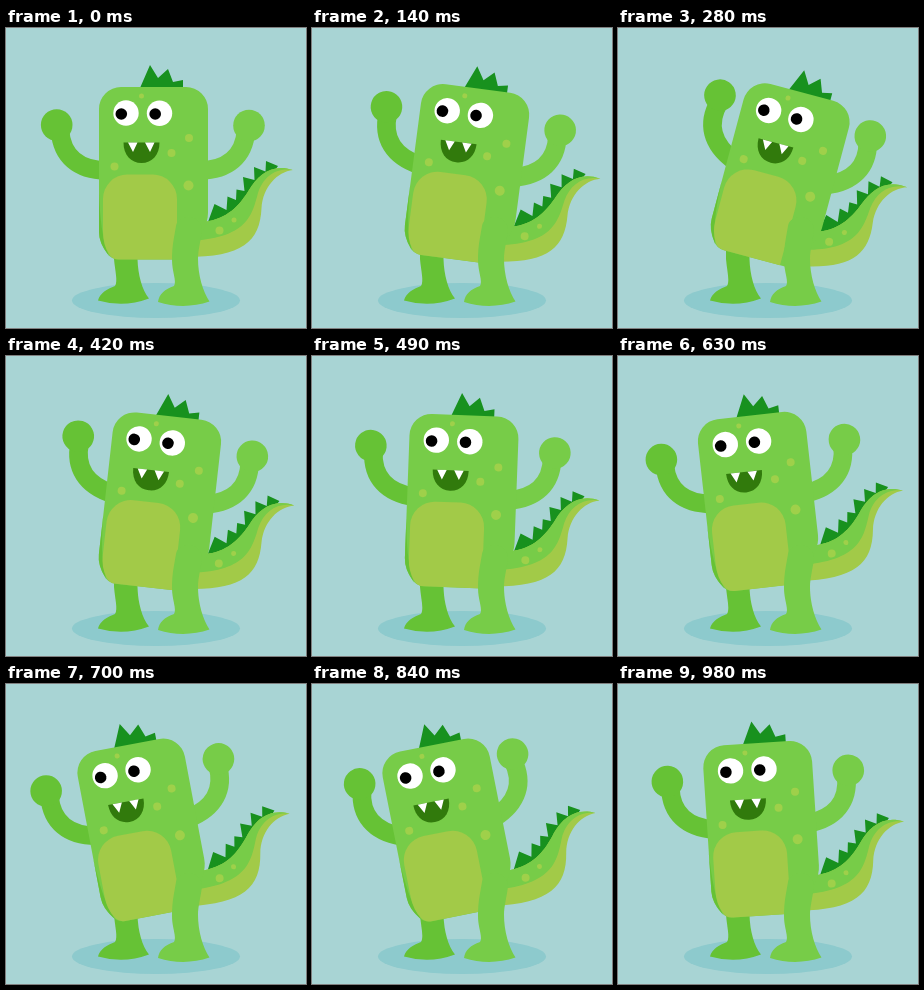
An HTML page for the animation above (1050 ms loop, 300 by 300 pixels).

```html
<!DOCTYPE html>
<html lang="en">
<head>
<meta charset="utf-8">
<title>Dancing dinosaur</title>
<style>
  html, body { margin: 0; height: 100%; overflow: hidden; background: #a8d4d4; }
  svg { display: block; width: 100%; height: 100%; }
  .skin { fill: #77cc48; }
  .shade { fill: #66c235; }
  .belly { fill: #a2ca48; }
  .spot { fill: #9fd04a; }
  .spike { fill: #18911e; }
  .limb { fill: none; stroke-width: 18.6; }
</style>
</head>
<body>
<svg viewBox="0 0 300 300">
  <ellipse cx="150" cy="272.5" rx="84" ry="17.5" fill="#8dcacd"/>

  <g id="tail">
    <path class="spike" d="M202 194L208.500 176L220.500 182L221.500 168.500L230 172L230.500 161.500L238.500 163L237 149L248.500 152L248 139L259.500 143.500L260 133L272 138L262 152L240 182L215 196Z"/>
    <path class="belly" d="M175 198L203 193C224 189 235 175 243 162C252 147 266 135 287 142C271 144 257 159 255.500 180C254 214 236 229 180 229Z"/>
    <path class="skin" d="M175 198L203 193C224 189 235 175 243 162C252 147 266 135 287 142C270 139 257 149 252 165C246 187 242 211 180 213Z"/>
    <g class="spot"><circle cx="213.500" cy="202.500" r="4"/><circle cx="228" cy="192" r="2.500"/></g>
  </g>

  <path class="shade" d="M108 215V231C109 243 112 253 109 258C101 261 94 265 92 272.500Q118 280 143 270.500C136 262 132 247 131.500 231V215Z"/>

  <g id="body">
    <g id="leftArm">
      <path class="limb" stroke="#66c235" d="M54 103C56 128 72 142 100 142.500"/>
      <circle class="shade" cx="50.700" cy="97" r="15.800"/>
    </g>
    <g id="rightArm">
      <path class="limb" stroke="#77cc48" d="M240 103C238 128 222 142 194 142.500"/>
      <circle class="skin" cx="243" cy="97.500" r="15.800"/>
    </g>
    <path class="spike" d="M134 60L144 37L152 50L162 41L167 54L177 52V64H134Z"/>
    <path class="skin" d="M93 81A22 22 0 0 1 115 59H180A22 22 0 0 1 202 81V185C202 198 194 205 192 215Q190 231 178 231.500H113Q105 231.500 101 225Q93 215 93 204Z"/>
    <path class="shade" d="M93 165C94 190 96 210 103 228Q93 215 93 204Z"/>
    <path class="belly" d="M97 171A24.500 24.500 0 0 1 121.500 146.500H146.500A24.500 24.500 0 0 1 171 171V231.500H113Q106 231.500 103 226Q97 217 97 204Z"/>
    <g class="spot">
      <circle cx="135.500" cy="68" r="2.500"/>
      <circle cx="183" cy="110" r="4"/>
      <circle cx="165.500" cy="125" r="4"/>
      <circle cx="108.500" cy="138.500" r="4"/>
      <circle cx="182.500" cy="157.500" r="5"/>
    </g>
    <g fill="#fff"><circle cx="120" cy="85" r="12.700"/><circle cx="153.500" cy="85.300" r="12.700"/></g>
    <circle cx="115.300" cy="86" r="5.800"/>
    <circle cx="149.200" cy="86" r="5.800"/>
    <path fill="#317a0c" d="M117.500 114.500H153.500C153.500 127 146 135 135.500 135S117.500 127 117.500 114.500Z"/>
    <path fill="#fff" d="M122 114.500H131.500L127 124ZM139 114.500H148.500L144 124Z"/>
  </g>

  <path class="skin" d="M170 198C172 185 196 185 196 202C195 212 192 222 192 231C192 247 197 264 203.500 273.500Q178 282 152 274C153 266 159 261 168 258C171 253 166 244 166 232C166 218 168 210 170 198Z"/>
</svg>
<script>
  const LOOP = 1050, STEP = 70;
  const LEAN = [[0, 0], [280, 15], [770, -15], [1050, 0]];
  const WAVE = [[0, 0], [280, 20], [560, 0], [840, 20], [1050, 0]];

  // Linear interpolation through [time, value] keys
  function at(keys, t) {
    const i = keys.findIndex(k => k[0] > t);
    const [t0, v0] = keys[i - 1], [t1, v1] = keys[i];
    return v0 + (v1 - v0) * (t - t0) / (t1 - t0);
  }

  const turn = (angle, x, y) => `rotate(${angle} ${x} ${y})`;
  const pose = (id, transform) =>
    document.getElementById(id).setAttribute("transform", transform);

  function draw(now) {
    const t = Math.floor(now % LOOP / STEP) * STEP;
    const lean = at(LEAN, t), wave = at(WAVE, t);
    const sway = turn(lean, 145, 200);
    pose("body", sway);
    pose("tail", sway + turn(-0.7 * lean, 179, 205));
    pose("leftArm", turn(wave, 100, 142));
    pose("rightArm", turn(-wave, 194, 142));
  }

  const start = performance.now();
  function tick() {
    draw(performance.now() - start);
    requestAnimationFrame(tick);
  }
  tick();
</script>
</body>
</html>
```
